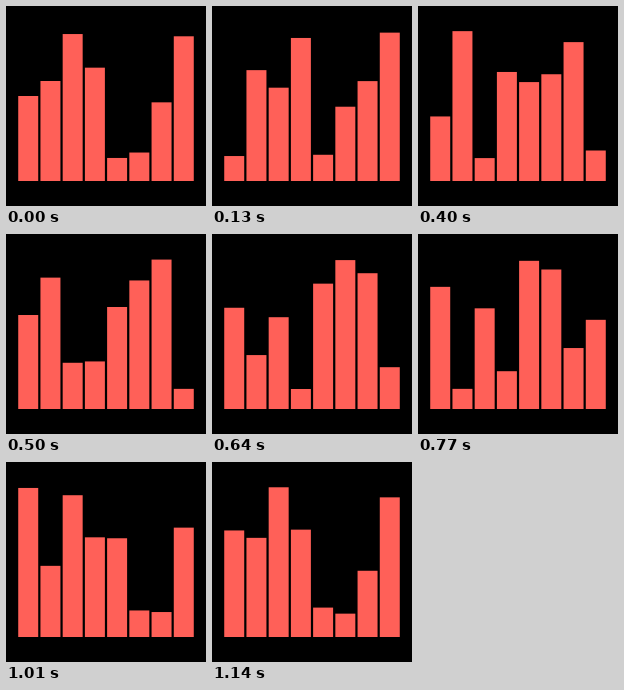
A matplotlib script that plays this animation: 200x200 px, repeating every 1.18 s.

```python
import numpy as np
import matplotlib.pyplot as plt
from matplotlib.animation import FuncAnimation
from matplotlib.patches import Rectangle

SIZE = 200
TICK = 10                  # ms
TICKS = 118                # one loop of 1180 ms
POSES = 35                 # distinct poses per loop
TICKS_PER_POSE = 400 / 119
BASE = 175
WIDTH = 20
LEVELS = [100, 150, 20, 100]
PHASES = np.array([4, 0, 3, 1, 5, 6, 7, 2]) / 8


def ease(x):
    """Cubic bezier timing curve (0.5, 0, 0.5, 1)."""
    lo, hi = 0.0, 1.0
    for _ in range(30):
        s = (lo + hi) / 2
        if 1.5 * s * (1 - s) + s ** 3 < x:
            lo = s
        else:
            hi = s
    return s * s * (3 - 2 * s)


def height(phase):
    pos = (phase % 1) * 3
    seg = min(int(pos), 2)
    start, end = LEVELS[seg], LEVELS[seg + 1]
    return start + (end - start) * ease(pos - seg)


fig = plt.figure(figsize=(2, 2), dpi=100, facecolor="black")
ax = fig.add_axes([0, 0, 1, 1])
ax.set_xlim(0, SIZE)
ax.set_ylim(SIZE, 0)
ax.axis("off")

bars = []
for i in range(len(PHASES)):
    center = SIZE * (i + 1) / (len(PHASES) + 1)
    bar = Rectangle((center - WIDTH / 2, BASE), WIDTH, 0,
                    facecolor="#ff6058", linewidth=0, snap=False)
    bars.append(ax.add_patch(bar))


def update(tick):
    # poses hold for three or four ticks each
    pose = int((tick + 0.5) / TICKS_PER_POSE)
    for bar, phase in zip(bars, PHASES):
        bar.set_height(-height(phase + pose / POSES))
    return bars


anim = FuncAnimation(fig, update, frames=TICKS, interval=TICK,
                     repeat=True, repeat_delay=0, blit=False)
plt.show()
```
